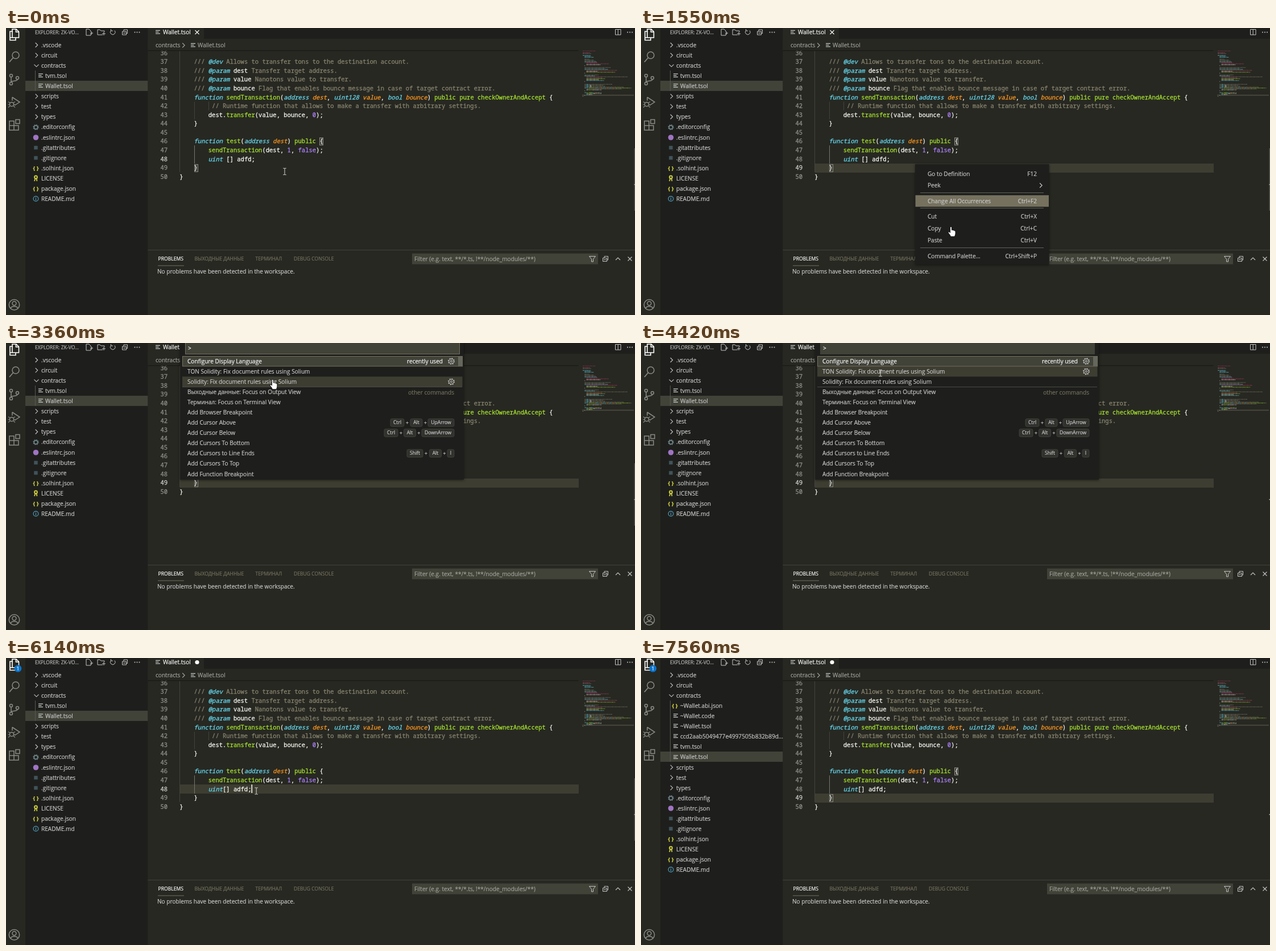
An HTML page that plays this animation: 1106x506 px, repeating every 7800 ms.

```html
<!DOCTYPE html>
<html lang="en">
<head>
<meta charset="utf-8">
<title>Editor: format document</title>
<style>
html, body { margin: 0; width: 100%; height: 100%; overflow: hidden; background: #272822; }
svg { display: block; width: 1106px; height: 506px; }
text { font: 10.1px "Open Sans", "Noto Sans", sans-serif; white-space: pre; fill: currentColor; stroke: currentColor; stroke-width: .16px; }
text.small { font-size: 8.6px; }
text.braces { font-size: 9.5px; font-weight: 700; }
text.code { font: 10.52px "Noto Sans Mono", "DejaVu Sans Mono", monospace; stroke-width: .28px; }
text.it { font-style: italic; }
.pop { filter: drop-shadow(0 1px 2px rgba(0,0,0,.5)); }
</style>
</head>
<body>
<svg id="stage" viewBox="0 0 1106 506"></svg>
<script>
const LOOP = 7800;
const BG = '#272822', DARK = '#1e1f1c', FIELD = '#414339', HOVER = '#3e3d32', MUTED = '#75715e';
const UI = '#cccccc', WHITE = '#ffffff', GREY = '#8b8b85', ICON = '#c5c5c5';
const INK = { c: '#88846f', k: '#66d9ef', w: '#f8f8f2', g: '#a6e22e', o: '#fd971f', p: '#ae81ff', r: '#c8376c' };

// ---------- markup helpers ----------
const esc = s => s.replace(/&/g, '&amp;').replace(/</g, '&lt;');
const label = (x, cy, s, color = UI, anchor = 'start', cls = '') =>
  `<text x="${x}" y="${Math.round(cy + (cls === 'small' ? 3.1 : 3.9))}" color="${color}" text-anchor="${anchor}" class="${cls}">${esc(s)}</text>`;
const box = (x, y, w, h, fill, more = '') =>
  `<rect x="${x}" y="${y}" width="${w}" height="${h}" fill="${fill}" ${more}/>`;
const line = (d, stroke = ICON, w = 1, more = '') =>
  `<path d="${d}" fill="none" stroke="${stroke}" stroke-width="${w}" ${more}/>`;
const ring = (x, y, r, stroke, w = 1, more = '') =>
  `<circle cx="${x}" cy="${y}" r="${r}" fill="none" stroke="${stroke}" stroke-width="${w}" ${more}/>`;
const dot = (x, y, r, fill) => `<circle cx="${x}" cy="${y}" r="${r}" fill="${fill}"/>`;
const group = (id, body) => `<g id="${id}">${body}</g>`;
const at = (x, y, body) => `<g transform="translate(${x} ${y})">${body}</g>`;

// ---------- small icons, centred on 0,0 ----------
const right = c => line('M-1.8-4 2.2 0-1.8 4', c, 1.1);
const down = c => line('M-4-1.8 0 2.2 4-1.8', c, 1.1);
const doc = c => line('M-4-3.2H4M-4-.4H1.5M-4 2.4H4', c, 1.3);
const cross = c => line('M-3.5-3.5 3.5 3.5M3.5-3.5-3.5 3.5', c, 1.1);
const more = c => dot(-4, 0, 1, c) + dot(0, 0, 1, c) + dot(4, 0, 1, c);
const gear = c => ring(0, 0, 3.2, c, 1.8) + ring(0, 0, 4.4, c, 1.4, 'stroke-dasharray="1.8 1.66"');
const cog = c => ring(0, 0, 4.2, c) + ring(0, 0, 5.2, c, 1.4, 'stroke-dasharray="2 2.08"') + ring(0, 0, 1.6, c);
const braces = () => label(0, -.6, '{ }', '#cbcb41', 'middle', 'braces');
const stack = c => line('M-4.5-1.5H2.5V4.5H-4.5ZM-2-1.5V-4.5H4.5V2H2.5M-3 1.5H1', c);
const key = () => ring(0, -2, 2.4, '#cbcb41', 2) + line('M-1 0-2.5 5M1 0 2 5', '#cbcb41', 1.8);
const info = () => ring(0, 0, 4.4, '#519aba', 1.2) + line('M0-.8V2.6M0-2.6V-1.5', '#519aba', 1.3);

// ---------- side bar tree ----------
const NEW_FILES = ['{~Wallet.abi.json', '-~Wallet.code', '-~Wallet.tsol', '-ccd2aab5049477e4997505b832b89d...'];
const ROOT_FILES = ['*.editorconfig', 'o.eslintrc.json', 'd.gitattributes', 'd.gitignore',
  '{.solhint.json', 'kLICENSE', '{package.json', 'iREADME.md'];
const FILE_ICON = {
  '{': braces, '-': () => doc('#c5c9c7'), '*': () => gear('#6d8086'),
  o: () => dot(0, 0, 4.8, '#a074c4'), d: () => box(-3.2, -3.2, 6.4, 6.4, '#41535b'), k: key, i: info
};
const TREE_ROW = 18.07;
function tree(extra) {
  const nested = [...extra, '-tvm.tsol', '-Wallet.tsol'];
  let cy = 30, out = '';
  const row = body => { out += body; cy += TREE_ROW; };
  const folder = (name, open) => row(at(53.5, cy, open ? down(ICON) : right(ICON)) + label(62, cy, name));
  const file = (s, x, tx) => row(at(x, Math.round(cy), FILE_ICON[s[0]]()) + label(tx, cy, s.slice(1)));
  folder('.vscode'); folder('circuit'); folder('contracts', true);
  const top = Math.round(cy - 9), end = Math.round(top + nested.length * TREE_ROW);
  out += box(34, end - 18, 215.5, 18, FIELD) + box(51, top, 1, end - top, '#585850');
  nested.forEach(s => file(s, s[0] === '{' ? 59.5 : 61, 69));
  ['scripts', 'test', 'types'].forEach(s => folder(s));
  ROOT_FILES.forEach(s => file(s, 52.5, 62));
  return out;
}

function sideBars() {
  const g = GREY, w = 1.5;
  return box(34, 0, 215.5, 506, DARK) +
    line('M11 17H7V6H12M11 2H18L22.5 6.5V17H11ZM17.5 2V7H22.5M7 8V21.5H17V17', WHITE, 1.6) +
    ring(17, 48, 6, g, w) + line('M12.7 52.3 6 60', g, 1.7) +
    [[9, 84], [9, 98], [20, 88]].map(p => ring(...p, 2.5, g, w)).join('') +
    line('M9 86.5V95.5M20 90.5C20 95 9 92 9 95.5', g, w) +
    line('M11 122 24 130.5 15 136.5M11 122V128', g, w) + ring(10, 134.5, 3.6, g, w) +
    line('M4 130 7 132M16 130 13 132M3.5 135H6.4M13.6 135H16.5M4 140 7 137.5M16 140 13 137.5', g, 1.1) +
    line('M6 164H14V180H6ZM6 172H22V180H14M17 161.5H24V168.5H17Z', g, w) +
    ring(14.5, 488, 9.2, g, w) + ring(14.5, 485.5, 3.4, g, w) + line('M8 494.5C10 489.5 19 489.5 21 494.5', g, w) +
    label(51, 7.5, 'EXPLORER: ZK-VO...', '#bbbbbb', 'start', 'small') +
    line('M146 2H141V13H149V10M146 2 149 5V7M148 9H153M150.5 6.5V11.5') +
    line('M170 12H161V3H165L167 5H173V7M169 10H175M172 7V13') +
    line('M184.5 4.5A4.3 4.3 0 1 0 191 4.5M184.5 2V5H188') +
    at(209, 7.5, stack(ICON)) + at(230.5, 7.5, more(ICON)) +
    group('treeShort', tree([])) + group('treeLong', tree(NEW_FILES)) +
    group('badge', dot(21, 18.5, 6.3, '#0b74cc') + label(21, 18.5, '1', WHITE, 'middle', 'small'));
}

// ---------- editor ----------
const LEFT = 305.3, CHAR = 6.31, ROW = 15.57;
const lineY = n => 44 + (n - 36) * ROW;
const lineTop = n => Math.round(lineY(n) - 7.8);
const codeText = (x, n, s, color, more = '') =>
  `<text class="code" x="${x}" y="${Math.round(lineY(n) + 3.7)}" color="${color}" ${more}>${esc(s)}</text>`;
const CODE = {
  37: '4 c/// |k@dev|c Allows to transfer tons to the destination account.',
  38: '4 c/// |k@param|w dest|c Transfer target address.',
  39: '4 c/// |k@param|w value|c Nanotons value to transfer.',
  40: '4 c/// |k@param|w bounce|c Flag that enables bounce message in case of target contract error.',
  41: '4 kfunction|g sendTransaction|w(|kaddress|o dest|w, |kuint128|o value|w, |kbool|o bounce|w) |gpublic pure checkOwnerAndAccept|w {',
  42: '9 c// Runtime function that allows to make a transfer with arbitrary settings.',
  43: '8 wdest.|gtransfer|w(value, bounce, |p0|w);',
  44: '4 w}',
  46: '4 kfunction|g test|w(|kaddress|o dest|w) |gpublic|w {',
  47: '8 gsendTransaction|w(dest, |p1|w, |pfalse|w);',
  48: '8 kuint|w [] adfd;',
  49: '4 w}',
  50: '0 w}'
};
const TIDY = '8 kuint|w[] adfd;';

function tokens(src) {
  let col = +src[0];
  return src.slice(2).split('|').map(s => {
    const body = s.slice(1), lead = body.length - body.trimStart().length;
    const t = { ink: s[0], col: col + lead, text: body.trim() };
    col += body.length;
    return t;
  });
}
const codeLine = (n, src) => tokens(src).map(t =>
  codeText(LEFT + t.col * CHAR, n, t.text, INK[t.ink], 'ko'.includes(t.ink) ? 'font-style="italic"' : '')
    .replace('class="code"', 'ko'.includes(t.ink) ? 'class="code it"' : 'class="code"')).join('');

// Each entry: indent, ink, length; "-" is an empty line.
const MINI = ('0r28 - 0r16 0c18 - 0k17 4k14 4k20 - 4c10 4c20 4c24 4k26 8r24 8r48 8w30 4w1 - ' +
  '4c56 4c44 4k50 8r66 8w24 8g62 4w1 - 4c30 4k22 8c88 8r34 8g40 8w26 8k38 4w1 -').split(' ');
function minimap() {
  const bar = (row, col, len, ink) => line(`M${1014 + col * .82} ${40.2 + row * 1.64}h${len * .82}`, INK[ink], 1,
    'opacity=".62" stroke-dasharray="3.4 .7 1.7 .5"');
  let out = box(1013, 117.6, 91, 1.8, '#4b4a3f');
  MINI.forEach((m, i) => { if (m !== '-') out += bar(i, +m[0], +m.slice(2), m[1]); });
  for (const n in CODE) tokens(CODE[n]).forEach(t => out += bar(n - 1, t.col, t.text.length, t.ink));
  return out;
}

function editor() {
  const guide = (col, a, b, c) => box(Math.round(LEFT + col * CHAR), lineTop(a), 1, lineTop(b + 1) - lineTop(a), c);
  let nums = '', code = '';
  for (let n = 36; n <= 50; n++)
    nums += group('n' + n, codeText(284, n, '' + n, 'inherit', 'text-anchor="end"'));
  for (const n in CODE) if (n != 48) code += codeLine(+n, CODE[n]);
  const mark = (col, n) => box(Math.round(LEFT + col * CHAR) + .5, lineTop(n) + 1.5, 6, 13, '#3a3b35', 'stroke="#8b8b82"');
  return box(249.5, 0, 857, 506, BG) +
    group('active', box(306, 0, 701, 16, HOVER)) +
    group('selection', box(0, lineTop(48), 1, 16, '#575959')) +
    guide(0, 36, 49, '#42433c') + guide(4, 42, 43, '#42433c') + guide(8, 42, 42, '#42433c') + guide(4, 47, 48, '#767771') +
    group('brackets', mark(39, 46) + mark(4, 49)) + `<g color="#90908a">${nums}</g>` + code +
    group('rough', codeLine(48, CODE[48])) + group('tidy', codeLine(48, TIDY)) +
    group('caret', box(0, 0, 1.6, 15, '#f8f8f0')) + minimap() +
    group('slider', box(1104.6, 212, 1.4, 110, '#55564f')) + box(1104.6, 275, 1.4, 2, '#a0a098') +
    box(249.5, 0, 857, 40, BG) + box(249.5, 39.2, 757, 1.4, '#1a1b18') +
    box(249.5, 0, 857, 19, DARK) + box(249.5, 0, 98.5, 19, BG) +
    at(267, 7.5, doc('#c5c9c7')) + label(276, 7.5, 'Wallet.tsol', WHITE) +
    group('tabClose', at(336, 7.5, cross(WHITE))) + group('tabDot', dot(336, 7.5, 3.6, WHITE)) +
    line('M1071.5 2.5H1081V12H1071.5ZM1076.2 2.5V12') + at(1097, 7.5, more(ICON)) +
    label(263, 30.5, 'contracts', '#a5a5a0') + at(312, 30.5, right('#a5a5a0')) +
    at(329, 30.5, doc('#c5c9c7')) + label(337, 30.5, 'Wallet.tsol', '#a5a5a0');
}

function panel() {
  const tab = (x, s, c) => label(x, 407, s, c, 'start', 'small');
  return box(249.5, 391, 857, 1, FIELD) +
    tab(267.5, 'PROBLEMS', WHITE) + box(267, 418.5, 46, 1, MUTED) +
    tab(331.5, 'ВЫХОДНЫЕ ДАННЫЕ', MUTED) + tab(438.5, 'ТЕРМИНАЛ', MUTED) + tab(506, 'DEBUG CONSOLE', MUTED) +
    group('tabHover', tab(506, 'DEBUG CONSOLE', WHITE)) +
    box(714, 397.5, 327, 19, FIELD) +
    label(718, 407, 'Filter (e.g. text, **/*.ts, !**/node_modules/**)', '#a3a39b') +
    line('M1025.5 402.5H1036.5L1032.5 407.5V412H1029.5V407.5Z') + at(1054, 407, stack(ICON)) +
    line('M1072 409 1076 405 1080 409', ICON, 1.1) + at(1097, 407, cross(ICON)) +
    label(266, 429, 'No problems have been detected in the workspace.');
}

// ---------- popups ----------
const MENU = [[257, 'Go to Definition', 'F12'], [277.5, 'Peek', ''], [305, 'Change All Occurrences', 'Ctrl+F2'],
  [332.5, 'Cut', 'Ctrl+X'], [353.5, 'Copy', 'Ctrl+C'], [374.5, 'Paste', 'Ctrl+V'], [402, 'Command Palette...', 'Ctrl+Shift+P']];
function menu() {
  return box(482, 240, 235.5, 177, DARK, 'class="pop"') +
    group('menuHover', box(482.5, -10.2, 234.5, 20.4, MUTED)) +
    [290, 317, 387].map(y => box(491, y, 217, 1, '#62625c')).join('') +
    MENU.map(([y, s, k]) => label(504, y, s) + label(696, y, k, UI, 'end')).join('') + at(703, 277.5, right(UI));
}

const COMMANDS = ['Configure Display Language', 'TON Solidity: Fix document rules using Solium',
  'Solidity: Fix document rules using Solium', 'Выходные данные: Focus on Output View',
  'Терминал: Focus on Terminal View', 'Add Browser Breakpoint', 'Add Cursor Above', 'Add Cursor Below',
  'Add Cursors To Bottom', 'Add Cursors to Line Ends', 'Add Cursors To Top', 'Add Function Breakpoint'];
const KEYS = {
  6: [[676, 24, 'Ctrl'], [711, 21, 'Alt'], [742, 46, 'UpArrow']],
  7: [[665, 24, 'Ctrl'], [699.5, 21, 'Alt'], [731, 57, 'DownArrow']],
  9: [[705, 28, 'Shift'], [744.5, 21, 'Alt'], [776, 12, 'I']]
};
const rowY = i => 32.2 + i * 18.04;
function palette() {
  const keycap = (x, w, s, cy, last) =>
    box(x, cy - 6.8, w, 13.6, '#31322e', 'rx="2.4" stroke="#464741" stroke-width=".8"') +
    label(x + w / 2, cy - .2, s, UI, 'middle', 'small') + (last ? '' : label(x + w + 5.5, cy, '+', UI, 'middle', 'small'));
  return box(306, -4, 499, 245, DARK, 'class="pop"') + box(315, -4, 483, 24, FIELD) +
    group('inputFocus', box(315.5, -4, 482, 23.5, 'none', `stroke="${MUTED}"`)) + label(320, 9.3, '>', WHITE) +
    group('inputCaret', box(326, 3.5, 1, 11.5, WHITE)) +
    group('rowHover', box(310, -9, 492.5, 18, HOVER) + at(783, 0, cog(ICON))) +
    box(310.5, 23.5, 492, 17.5, FIELD, 'stroke="#75715e"') + box(795, 23.5, 7.5, 17.5, '#65665c') +
    box(310, 77, 492, 1, '#4a4a45') +
    label(768, 32.2, 'recently used', WHITE, 'end') + at(783, 32.2, cog(ICON)) +
    label(788, 87, 'other commands', MUTED, 'end') +
    COMMANDS.map((s, i) => label(319, rowY(i), s, i ? UI : WHITE)).join('') +
    Object.entries(KEYS).map(([i, ks]) => ks.map((k, j) => keycap(...k, rowY(+i), j === 2)).join('')).join('');
}

// ---------- pointers, hot spot on 0,0 ----------
function pointers() {
  const beam = 'M-2.7-5.7H-.8Q0-5.7 0-5 0-5.7.8-5.7H2.7M0-5V5M-2.7 5.7H-.8Q0 5.7 0 5 0 5.7.8 5.7H2.7';
  const hand = 'M-1.4 1.2Q0-.6 1.4 1.2V6.2Q2.6 5.4 3.8 6.6 5 6 6 7.3 8 7 8 9.2V13Q7.6 15.5 6.3 17.8H-.2Q-2 14-4.6 11.2-5.2 9.2-3.2 9.3L-1.4 11Z';
  return group('beam', line(beam, '#d8d8d4', 1)) +
    group('hand', `<path d="${hand}" fill="#fff" stroke="#111" stroke-width=".9"/>`) +
    group('arrow', '<path d="M0 0V13.5L3.2 10.6 5.4 15.4 7.5 14.4 5.3 9.8H9.6Z" fill="#fff" stroke="#111" stroke-width=".8"/>');
}

document.getElementById('stage').innerHTML =
  sideBars() + editor() + panel() + group('menu', menu()) + group('palette', palette()) + pointers();

// ---------- motion ----------
// Each move: start, end, number of steps, waypoints evenly spread over the steps.
const MOVES = [
  [440, 510, 2, [[490, 253], [485, 240]]],
  [1490, 1970, 9, [[485, 240], [510, 298], [545, 350], [562, 392], [572, 418], [577, 412], [576, 404], [575, 400], [575, 398], [575, 398]]],
  [2910, 3420, 9, [[575, 398], [560, 300], [525, 170], [480, 80], [460, 51]]],
  [3600, 3930, 6, [[460, 51], [421, 53]]],
  [5440, 6190, 13, [[421, 53], [421, 53], [450, 150], [470, 240], [450, 240], [434, 231]]],
  [6250, 6990, 13, [[434, 231], [420, 231], [395, 231], [372, 231], [356, 231], [356, 231], [400, 238], [460, 242], [505, 243],
    [508, 248], [508, 248], [540, 290], [590, 350], [650, 405]]],
  [7050, 7230, 4, [[650, 405], [955, 515]]]
];
function pointerAt(t) {
  let pos = MOVES[0][3][0];
  for (const [start, end, steps, pts] of MOVES) {
    if (t < start) break;
    const k = Math.min(steps - 1, Math.floor((t - start) / (end - start) * (steps - 1)));
    const f = (k + 1) / steps * (pts.length - 1) + 1e-9;
    const i = Math.min(pts.length - 2, Math.floor(f)), u = f - i;
    pos = [0, 1].map(a => pts[i][a] + (pts[i + 1][a] - pts[i][a]) * u);
  }
  return pos;
}

const $ = id => document.getElementById(id);
const show = (id, on) => $(id).style.display = on ? '' : 'none';
const place = (id, x, y) => $(id).setAttribute('transform', `translate(${x} ${y})`);
const within = (t, a, b) => t >= a && t < b;
const blink = (t, since) => Math.floor((t - since) / 500) % 2 === 0;
const MENU_OPEN = 1120, PALETTE_OPEN = 2540, BLUR = 4360, PALETTE_SHUT = 4480, FORMAT = 5190, CLICK = 6130, DRAG = 6250, RELEASE = 6805;

function render(t) {
  const [x, y] = pointerAt(t);
  const menuOn = within(t, MENU_OPEN, PALETTE_OPEN), paletteOn = within(t, PALETTE_OPEN, PALETTE_SHUT);

  const on48 = within(t, CLICK, RELEASE), current = t < 990 || on48 ? 48 : 49;
  for (const n of [48, 49]) $('n' + n).setAttribute('color', n === current ? '#d0d0cc' : '#90908a');
  show('active', t >= 990 && !within(t, DRAG, RELEASE));
  place('active', 0, lineTop(current));
  show('brackets', !on48);

  const lineEnd = LEFT + 20 * CHAR, selecting = within(t, DRAG, RELEASE);
  const lineStart = t > 6490 ? LEFT + 8 * CHAR : LEFT + Math.max(8, Math.min(20, Math.round((x - LEFT) / CHAR))) * CHAR;
  show('selection', selecting);
  $('selection').firstChild.setAttribute('x', lineStart);
  $('selection').firstChild.setAttribute('width', Math.max(0, lineEnd - lineStart));

  const caretOn = within(t, 990, MENU_OPEN) || on48 || within(t, RELEASE, 7170) ||
    (within(t, PALETTE_SHUT, CLICK) && blink(t, 4440));
  show('caret', caretOn);
  if (on48) place('caret', selecting ? lineStart : lineEnd, lineTop(48));
  else place('caret', 335.4, lineTop(49));

  show('rough', t < FORMAT); show('tidy', t >= FORMAT);
  show('badge', t >= FORMAT); show('tabClose', t < FORMAT); show('tabDot', t >= FORMAT);
  show('treeShort', t < 7500); show('treeLong', t >= 7500);
  show('slider', t < BLUR || within(t, 4540, 6990));
  show('tabHover', within(t, PALETTE_OPEN, 2910));

  show('menu', menuOn);
  show('menuHover', menuOn && t >= 1490);
  place('menuHover', 0, t < 1610 ? 305 : 402);

  show('palette', paletteOn);
  show('inputFocus', t < BLUR);
  show('inputCaret', t < BLUR && blink(t, PALETTE_OPEN));
  const hovered = Math.floor((y - 23.2) / 18.04);
  show('rowHover', paletteOn && hovered > 0 && hovered < 12);
  place('rowHover', 0, rowY(hovered));

  const kind = within(t, MENU_OPEN, BLUR) ? 'hand' : y > 391 ? 'arrow' : 'beam';
  for (const id of ['beam', 'hand', 'arrow']) show(id, id === kind);
  place(kind, x, y);
}

const start = performance.now();
function tick() {
  render((performance.now() - start) % LOOP);
  requestAnimationFrame(tick);
}
tick();
</script>
</body>
</html>
```
